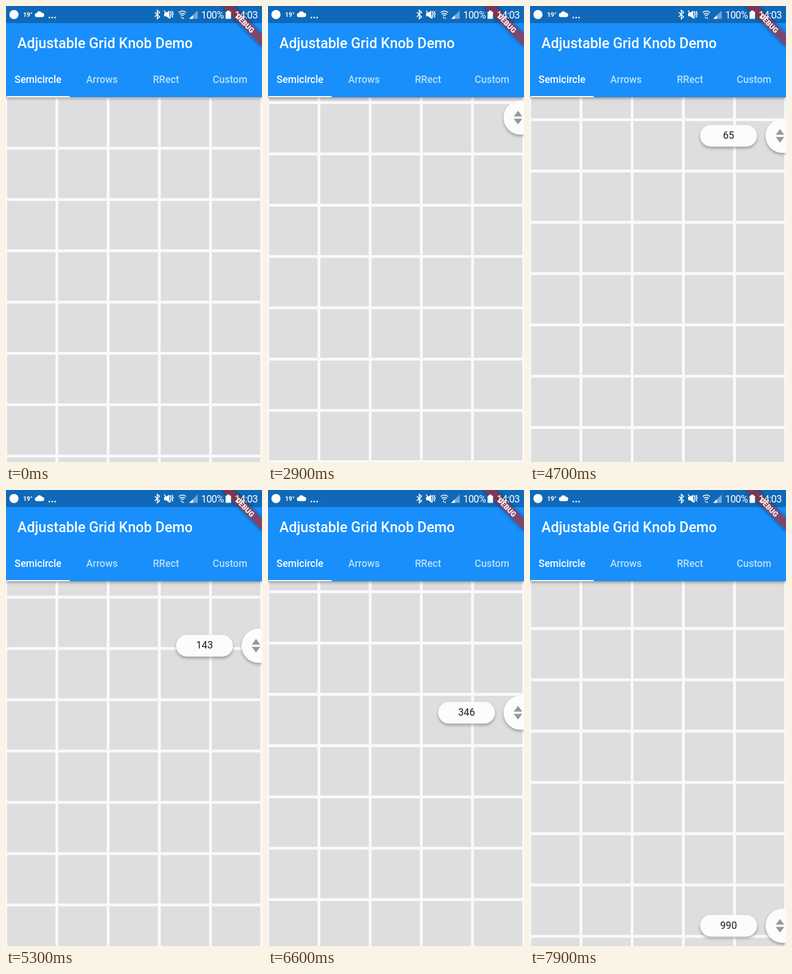
Animation, 450 px wide and 800 px high, one loop 8000 ms. Source, as an HTML page:

```html
<!DOCTYPE html>
<html lang="en">
<head>
<meta charset="utf-8">
<title>Scroll thumb</title>
<style>
  html, body { margin: 0; width: 100%; height: 100%; overflow: hidden; }
  body { position: relative; background: #f9f8fa; font-family: Roboto, sans-serif; }
  .stage { position: absolute; inset: 0; width: 450px; height: 800px; overflow: hidden; }
  .list { position: absolute; top: 160px; width: 450px; height: 640px; overflow: hidden; }
  .grid {
    --gap: #f9f8fa 2.5px, transparent 0, transparent 87.5px, #f9f8fa 0;
    height: 810px;
    background: linear-gradient(var(--gap)) 0 0 / 90px 90px,
                linear-gradient(90deg, var(--gap)) 0 0 / 90px 90px, #dfdedf;
  }
  .thumb, .label { position: absolute; background: #fcfcfc; box-shadow: 0 3px 5px rgba(0, 0, 0, .3); }
  .handle { position: absolute; top: 0; left: 0; width: 450px; height: 60px; }
  .thumb { left: 414px; width: 36px; height: 60px; border-radius: 30px 2.5px 2.5px 30px; }
  .thumb svg { display: block; fill: #98979c; }
  .label {
    left: 299px; top: 11.25px; width: 100px; height: 37.5px; border-radius: 19px;
    font-size: 17.5px; line-height: 37.5px; text-align: center; color: #1c1c1c;
  }
  .bar {
    position: absolute; top: 0; width: 450px; height: 160px; color: #fff; font-weight: 500;
    background: linear-gradient(#1069b8 30px, #188ffa 0);
    box-shadow: 0 2px 5px rgba(0, 0, 0, .38);
  }
  .title { position: absolute; left: 20px; top: 31px; font-size: 25px; line-height: 70px; white-space: nowrap; }
  .tabs { position: absolute; top: 100px; width: 450px; display: flex; font-size: 17.5px; line-height: 58px; }
  .tabs span { width: 112.5px; text-align: center; opacity: .7; }
  .tabs span:first-child { opacity: 1; }
  .tabs::after { content: ""; position: absolute; left: 1px; top: 57.5px; width: 110.5px; height: 2.5px; background: #fff; }
  .ribbon {
    position: absolute; left: 370px; top: 22.5px; width: 100px; height: 15px; transform: rotate(45deg);
    background: rgba(183, 28, 28, .63); box-shadow: 0 0 6px rgba(0, 0, 0, .5);
    color: #fff; font-size: 12.75px; font-weight: 900; line-height: 15px; text-align: center;
  }
  .status { position: absolute; top: 0; left: 0; fill: #fff; }
  .status text { font-size: 17.5px; letter-spacing: -.7px; }
  .status .small { font-size: 11px; font-weight: 700; letter-spacing: 0; }
  .line { fill: none; stroke: #fff; stroke-width: 1.6; }
</style>
</head>
<body>
<div class="stage">
  <div class="list"><div class="grid" id="grid"></div></div>
  <div class="handle" id="handle">
    <div class="label" id="label"></div>
    <div class="thumb">
      <svg width="36" height="60"><path d="M25.5 18l7.5 10h-15zM25.5 42l7.5-10h-15z"/></svg>
    </div>
  </div>
  <div class="bar">
    <div class="title">Adjustable Grid Knob Demo</div>
    <div class="tabs"><span>Semicircle</span><span>Arrows</span><span>RRect</span><span>Custom</span></div>
  </div>
  <div class="ribbon">DEBUG</div>
  <svg class="status" width="450" height="30">
    <circle cx="14" cy="15" r="8"/>
    <text class="small" x="30" y="19">19°</text>
    <path d="M54.500 19.500a3.500 3.500 0 0 1-.5-7a5 5 0 0 1 9.200-.5a3.800 3.800 0 0 1 1 7.500z"/>
    <path d="M75 19h2.500v2.500h-2.500zM80 19h2.500v2.500h-2.500zM85 19h2.500v2.500h-2.500z"/>
    <path class="line" d="M261.500 11l8.500 8l-4 3.500v-15l4 3.500l-8.500 8"/>
    <path d="M278 12h3.500l5.500-4v14l-5.500-4h-3.500z"/>
    <path class="line" d="M278 8l11 14M290 9l-1.500 2l2 3l-2 3l1.500 3M293.500 9l-1.500 2l2 3l-2 3l1.500 3"/>
    <path class="line" d="M303.500 11.500q6.500-5.500 13 0M305.500 14.500q4.500-3.500 9 0M307.500 17q2.500-2 5 0"/>
    <path d="M307 19l2 3.500l.5-3.500zM313 22.500l-2-3.500l-.5 3.500z"/>
    <path opacity=".4" d="M322 22.500L337 8v14.500z"/>
    <path d="M322 22.500l6.500-6.300v6.300z"/>
    <text x="343" y="21.500">100%</text>
    <path d="M386 10h2.500v-2h4.500v2h2.500v12.500h-9.500z"/>
    <text x="402" y="21.500">14:03</text>
  </svg>
</div>
<script>
  const LOOP = 8000, TICK = 100;
  const ITEMS = 1000, ROW = 90, MAX_SCROLL = 17360, TRACK = 580;
  const FLING = { start: 2900, end: 3800, from: 170, to: 615.5 };

  // [time, scroll offset]
  const swipe = [[2500, 0], [2600, 8], [2700, 35], [2800, 92], [2900, 170]];
  const drag = [
    [4300, 615.5], [4400, 640], [4700, 1130], [5300, 2491.5], [6600, 6011],
    [6800, 6600], [6900, 6600], [7000, 7200], [7200, 9400], [7500, 14000],
    [7600, 14000], [7700, 15200], [7900, 17196.5]
  ];

  const byId = id => document.getElementById(id);
  const grid = byId('grid'), handle = byId('handle'), label = byId('label');
  const clamp = x => Math.min(1, Math.max(0, x));
  const smooth = x => x * x * (3 - 2 * x);
  const appear = (t, start) => smooth(clamp((t - start) / 300));

  function follow(points, t) {
    const next = points.findIndex(p => p[0] > t);
    if (next === 0) return points[0][1];
    if (next < 0) return points[points.length - 1][1];
    const [t0, y0] = points[next - 1], [t1, y1] = points[next];
    return y0 + (y1 - y0) * (t - t0) / (t1 - t0);
  }

  function scrollAt(t) {
    if (t < FLING.start) return follow(swipe, t);
    if (t > FLING.end) return follow(drag, t);
    const left = (FLING.end - t) / (FLING.end - FLING.start);
    return FLING.to - (FLING.to - FLING.from) * left ** 2.65;
  }

  function render(t) {
    const offset = scrollAt(t), part = offset / MAX_SCROLL;
    const shown = appear(t, 2500);
    grid.style.transform = `translateY(${-(offset % ROW)}px)`;
    handle.style.transform = `translate(${(1 - shown) * 11}px, ${160 + part * TRACK}px)`;
    handle.style.opacity = shown;
    label.style.opacity = appear(t, 4300);
    label.textContent = Math.floor(part * ITEMS);
  }

  const begin = performance.now();
  function frame() {
    const t = (performance.now() - begin) % LOOP;
    render(Math.floor(t / TICK) * TICK);
    requestAnimationFrame(frame);
  }
  frame();
</script>
</body>
</html>
```
